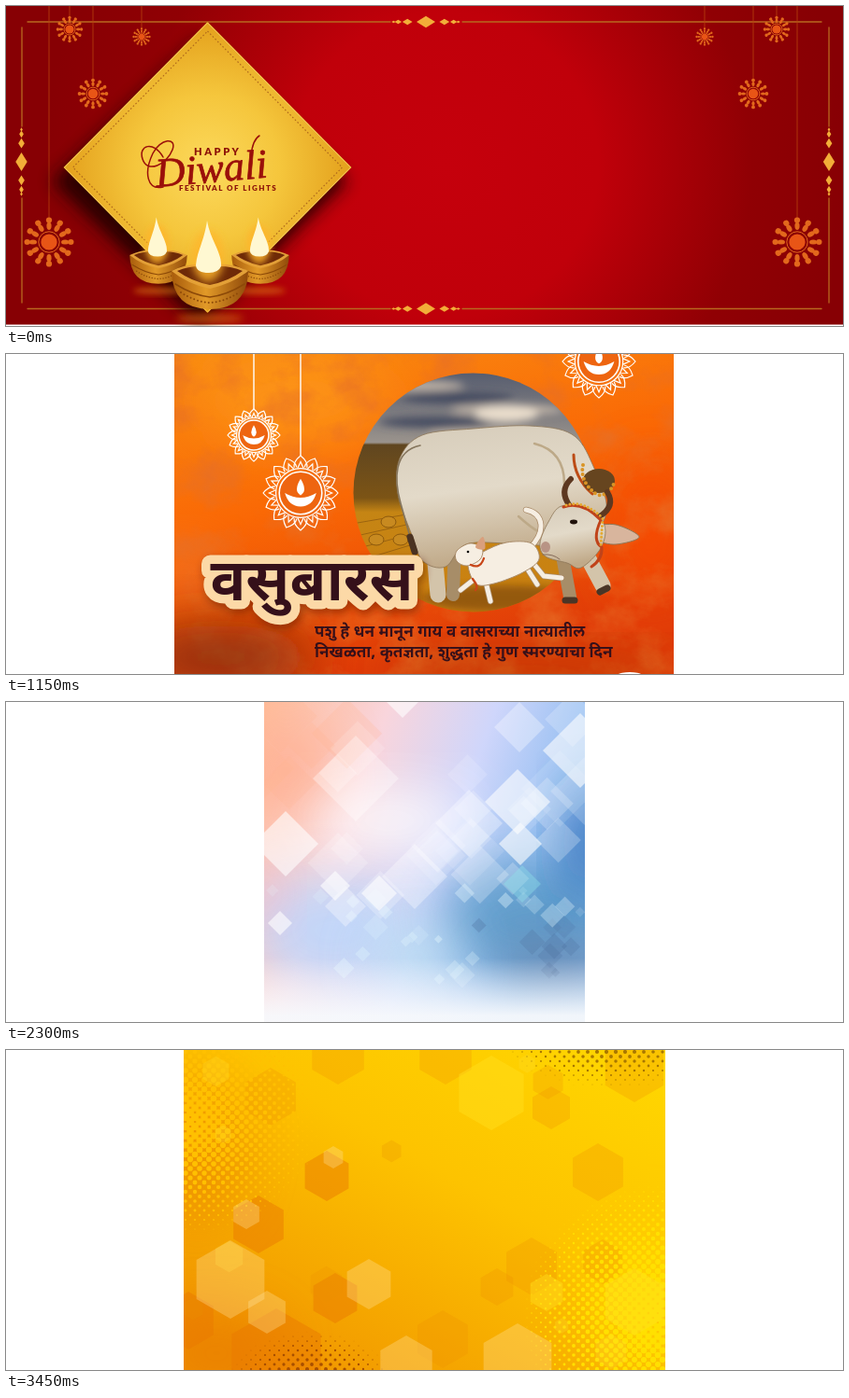
Write an HTML page that moves like this. It is 895 by 343 pixels and loops after 4600 ms.

```html
<!DOCTYPE html>
<html lang="mr">
<head>
<meta charset="utf-8">
<title>Festive banners</title>
<style>
html, body { margin: 0; width: 100%; height: 100%; overflow: hidden; background: #fff }
svg { display: block }
.caps { font-family: Lato, sans-serif; font-weight: 900; fill: #8c1208 }
.script { font: italic 44px "Liberation Serif", serif; fill: #9a0f0a; stroke: #9a0f0a; stroke-width: .7 }
.deva { font-family: "Noto Sans Devanagari", "Noto Sans", sans-serif; fill: #35101a }
</style>
</head>
<body>
<svg width="895" height="343" viewBox="0 0 895 343">
<defs>
  <radialGradient id="red" gradientUnits="userSpaceOnUse" cx="470" cy="170" r="430">
    <stop stop-color="#c5000c"/><stop offset=".38" stop-color="#c0000a"/>
    <stop offset=".76" stop-color="#900004"/><stop offset="1" stop-color="#870004"/>
  </radialGradient>
  <radialGradient id="gold"><stop stop-color="#fcd95c"/><stop offset=".5" stop-color="#f5c63c"/><stop offset="1" stop-color="#e3a01c"/></radialGradient>
  <linearGradient id="bowl"><stop stop-color="#a85c0c"/><stop offset=".45" stop-color="#e29a28"/><stop offset="1" stop-color="#904a0a"/></linearGradient>
  <linearGradient id="orange" x2=".35" y2="1"><stop stop-color="#f98c12"/><stop offset=".5" stop-color="#fa6805"/><stop offset="1" stop-color="#e03c08"/></linearGradient>
  <linearGradient id="land" x2="0" y2="1">
    <stop stop-color="#575d6f"/><stop offset=".29" stop-color="#9a938c"/><stop offset=".3" stop-color="#604620"/>
    <stop offset=".52" stop-color="#7c5415"/><stop offset=".58" stop-color="#c58514"/><stop offset="1" stop-color="#cc8010"/>
  </linearGradient>
  <linearGradient id="hide" x2=".2" y2="1"><stop stop-color="#d6ccba"/><stop offset=".5" stop-color="#e3dac9"/><stop offset="1" stop-color="#c0a988"/></linearGradient>
  <linearGradient id="sky" x2="1" y2=".35"><stop stop-color="#ffbf9c"/><stop offset=".35" stop-color="#f9d5dc"/><stop offset=".65" stop-color="#cfd6fb"/><stop offset="1" stop-color="#84b8ee"/></linearGradient>
  <linearGradient id="fade" x2="0" y2="1"><stop offset=".8" stop-color="#fff" stop-opacity="0"/><stop offset=".98" stop-color="#f7f9fc" stop-opacity=".95"/></linearGradient>
  <linearGradient id="amber" x1="1" x2=".15" y2="1"><stop stop-color="#ffd800"/><stop offset=".45" stop-color="#fdc300"/><stop offset="1" stop-color="#f09300"/></linearGradient>
  <filter id="b4" x="-50%" y="-50%" width="200%" height="200%"><feGaussianBlur stdDeviation="4"/></filter>
  <filter id="b9" x="-50%" y="-50%" width="200%" height="200%"><feGaussianBlur stdDeviation="9"/></filter>
  <filter id="b28" x="-80%" y="-80%" width="260%" height="260%"><feGaussianBlur stdDeviation="28"/></filter>
  <filter id="grunge" x="0" y="0" width="100%" height="100%">
    <feTurbulence type="fractalNoise" baseFrequency=".02 .026" numOctaves="6" seed="4"/>
    <feColorMatrix values="0 0 0 0 .8  0 0 0 0 .16  0 0 0 0 .02  2.2 0 0 0 -.9"/>
  </filter>
  <clipPath id="c1"><rect x="180" width="534" height="343"/></clipPath>
  <clipPath id="c2"><rect x="276" width="343" height="343"/></clipPath>
  <clipPath id="c3"><rect x="190" width="515" height="343"/></clipPath>
  <clipPath id="disc"><circle cx="499.5" cy="148.5" r="128"/></clipPath>
</defs>
<g id="scenes"></g>
</svg>
<script>
const HOLD = 1150;
const times = (n, fn) => Array.from({ length: n }, (_, i) => fn(i)).join('');
const points = s => s.split(',').map(p => p.trim().split(' ').map(Number));
const each = (s, fn) => points(s).map(p => fn(...p)).join('');
const circle = (x, y, r, a = '') => `<circle cx="${x}" cy="${y}" r="${r}" ${a}/>`;
const oval = (x, y, rx, ry, a = '') => `<ellipse cx="${x}" cy="${y}" rx="${rx}" ry="${ry}" ${a}/>`;
const glow = (x, y, rx, ry, color, o = 1) => oval(x, y, rx, ry, `fill="${color}" opacity="${o}" filter="url(#b28)"`);
const path = (d, a = '') => `<path d="${d}" ${a}/>`;
const line = (d, color, w, a = '') => path(d, `fill="none" stroke="${color}" stroke-width="${w}" stroke-linecap="round" stroke-linejoin="round" ${a}`);
const diamond = (x, y, w, h = w) => `M${x} ${y - h}l${w} ${h}l${-w} ${h}l${-w} ${-h}z`;
const hexagon = (x, y, r) => `M${x} ${y - r}l${r * .866} ${r / 2}v${r}l${-r * .866} ${r / 2}l${-r * .866} ${-r / 2}v${-r}z`;
const dot = (x, y, r) => `M${x - r} ${y}a${r} ${r} 0 1 0 ${2 * r} 0a${r} ${r} 0 1 0 ${-2 * r} 0`;

// Closed smooth outline through a few points
function blob(s, a) {
  const p = points(s), n = p.length, at = i => p[(i + n) % n];
  const mix = (a, b, c) => [0, 1].map(k => a[k] + (b[k] - c[k]) / 6);
  return path('M' + p[0] + p.map((q, i) =>
    `C${mix(q, at(i + 1), at(i - 1))} ${mix(at(i + 1), q, at(i + 2))} ${at(i + 1)}`).join('') + 'z', a);
}

function seeded(seed) {
  return (a = 0, b = 1) => {
    seed = (seed * 16807) % 2147483647;
    return a + (b - a) * seed / 2147483647;
  };
}

// Red banner with lamps
function rosette(x, y, r) {
  const spoke = i => `<g transform="rotate(${i * 30})">` +
    oval(0, -r * .66, r * .1, r * .16) + circle(0, -r * .9, r * .12) + '</g>';
  return line(`M${x} 0V${y - r}`, '#b8430f', .8) +
    `<g transform="translate(${x} ${y})" fill="#e2681c">` + circle(0, 0, r * .33, 'fill="#e85516"') +
    circle(0, 0, r * .43, 'fill="none" stroke="#e2681c"') + times(12, spoke) + '</g>';
}

function diya(x, y, s) {
  return `<g transform="translate(${x} ${y}) scale(${s})">` +
    oval(0, 47, 36, 5, 'fill="#e07a10" opacity=".6" filter="url(#b4)"') +
    path('M-41-4Q-40 37 0 37Q40 37 41-4z', 'fill="url(#bowl)"') +
    path('M-41-4Q-20-14 0-10Q20-14 41-4Q24 10 0 15Q-24 10-41-4z', 'fill="#e3a038"') +
    path('M-35-4Q-18-11 0-8Q18-11 35-4Q20 7 0 11Q-20 7-35-4z', 'fill="#6e2a08"') +
    line('M-37 10Q-18 22 0 24Q18 22 37 10', '#8c4908', 1.5) +
    line('M-31 19Q-16 29 0 30Q16 29 31 19', '#8c4908', 2, 'stroke-dasharray="0 4"') +
    oval(-2, -20, 17, 28, 'fill="#ffb62c" opacity=".8" filter="url(#b4)"') +
    path('M-3-58C0-38 13-24 12-9Q9-2-1-2Q-14-2-15-10C-14-25-6-36-3-58z', 'fill="#fff8d2"') + '</g>';
}

function festival() {
  let gems = '';
  for (let i = 0; i < 4; i++) for (const side of [-1, 1]) {
    const d = side * 35 * (1 - .5 ** i) * 1.13, a = i ? 7 - 1.6 * i : 10, b = a * .62;
    for (const y of [17, 324.5]) gems += diamond(449 + d, y, a, b);
    for (const x of [16.5, 880]) gems += diamond(x, 167 + d, b, a);
  }
  return '<rect width="895" height="341.5" fill="url(#red)"/>' +
    line('M23 17H411M488 17H872M23 324.5H411M488 324.5H872M17 23V129M17 206V318M880 23V129M880 206V318', '#b9681f', 1.3) +
    path(gems, 'fill="#f2ad38"') +
    each('68 25 14,145 33 9.5,93 94 16,46 253 26', (x, y, r) => rosette(x, y, r) + rosette(892 - x, y, r)) +
    path(diamond(207, 188, 158, 154), 'fill="#200" opacity=".9" filter="url(#b9)"') +
    path(diamond(215.5, 173, 154, 156), 'fill="url(#gold)"') +
    path(diamond(215.5, 173, 153, 155), 'fill="none" stroke="#f5cf60"') +
    path(diamond(215.5, 173, 144, 146), 'fill="none" stroke="#b06a1c" stroke-width="1.2" stroke-dasharray="1.6 2.2"') +
    '<text class="caps" x="201" y="160" font-size="11" letter-spacing="2.6">HAPPY</text>' +
    '<text class="script" transform="translate(161 194) rotate(-5)">Diwali</text>' +
    line('M168 162C158 144 141 149 146 164C151 180 172 170 178 154C183 140 165 142 157 158C147 179 151 198 168 194M262 160Q264 143 271 139', '#9a0f0a', 1.5) +
    '<text class="caps" x="185" y="198" font-size="8" letter-spacing="1.5">FESTIVAL OF LIGHTS</text>' +
    diya(163, 270, .75) + diya(272, 270, .75) + diya(218, 288, 1);
}

// Cow and calf poster
function pendant(x, y, r) {
  const petal = i => `<g transform="rotate(${i * 22.5})">` +
    path(`M${-r * .17} ${-r * .68}Q${-r * .2} ${-r * .84} 0 ${-r}Q${r * .2} ${-r * .84} ${r * .17} ${-r * .68}`) +
    path(`M${-r * .08} ${-r * .66}L0 ${-r * .84}L${r * .08} ${-r * .66}`) + '</g>';
  return line(`M${x} 0V${y - r}`, '#fff', 1.4) +
    `<g transform="translate(${x} ${y})" fill="none" stroke="#fff" stroke-width="1.2">` + times(16, petal) +
    circle(0, 0, r * .66) + circle(0, 0, r * .57, 'fill="#ee6510" stroke-width="1.6"') +
    `<g fill="#fff" stroke="none" transform="scale(${r})"><path d="M-.42 0Q0 .25 .42 0Q.32 .36 0 .36Q-.32 .36-.42 0z"/>` +
    '<path d="M0-.38Q.2-.05 0 .06Q-.2-.05 0-.38z"/></g></g>';
}

function cow() {
  const hide = 'fill="url(#hide)" stroke="#8d7758" stroke-width=".8"';
  return line('M480 205L478 258M596 222L603 260', '#a78d68', 14) +
    line('M456 190L462 258M622 218L638 248', '#d3c4aa', 17) +
    blob('419 150,421 112,445 87,500 80,560 77,605 86,627 118,642 170,610 204,540 203,492 204,470 228,446 222,434 194', hide) +
    line('M443 98C414 104 415 135 422 160L432 196', '#85755c', 1.6) +
    line('M432 196L437 212', '#4b3322', 7) +
    line('M565 96Q597 104 597 139M548 174Q572 196 590 199', '#bda988', 2.5) +
    line('M607 108Q607 132 627 150', '#bc4b15', 3) +
    oval(634, 136, 17, 13, 'fill="#66451f"') +
    line('M617 119Q613 137 632 151Q644 153 650 139', '#d99425', 4, 'stroke-dasharray="0 5"') +
    line('M603 163Q591 147 604 134M635 174Q652 163 643 148', '#5d3820', 6) +
    blob('630 186,652 183,677 196,652 204,632 199', 'fill="#d8b59d" stroke="#8d7758"') +
    blob('594 163,622 166,640 184,636 208,615 229,600 224,577 217,571 203,580 180', hide) +
    line('M596 164Q616 157 636 178Q626 200 637 207Q638 220 626 228', '#c0431a', 3) +
    line('M599 162Q618 156 638 176L636 205', '#e5a92f', 3, 'stroke-dasharray="0 4"') +
    oval(607, 180, 4, 2.4, 'fill="#21130c"') + oval(577, 207, 5, 6, 'fill="#b89485"') +
    line('M574 215Q585 214 592 220', '#856b5b', 1) +
    line('M598 264H608M635 255L643 251', '#493526', 7);
}

function calf() {
  const coat = '#f6eee2', edge = '#a98a68';
  const limbs = 'M560 208C578 190 575 171 556 167M505 238L486 253M512 240L518 265M562 222L575 238L594 240M556 228L568 247';
  return line(limbs, edge, 6.5) + line(limbs, coat, 5) +
    blob('494 222,510 212,535 202,562 203,570 220,553 234,522 246,502 246', `fill="${coat}" stroke="${edge}"`) +
    blob('482 211,496 203,509 208,507 220,493 227,482 222', `fill="${coat}" stroke="${edge}"`) +
    blob('502 207,510 196,512 209', 'fill="#d99f7c"') +
    line('M497 226Q507 231 511 219M499 241Q506 250 502 253', '#c84518', 2.3) + circle(494, 212, 1.3);
}

function poster() {
  const title = 'class="deva" x="327" y="264" font-size="63" font-weight="700" text-anchor="middle" stroke-linejoin="round"';
  return '<g clip-path="url(#c1)"><rect x="180" width="534" height="343" fill="url(#orange)"/>' +
    glow(310, 50, 100, 50, '#ffa01a', .6) + glow(690, 190, 40, 80, '#fb4a05', .7) + glow(190, 235, 26, 24, '#e8a56a', .5) +
    '<rect x="180" width="534" height="343" filter="url(#grunge)" opacity=".75"/>' +
    glow(230, 325, 100, 34, '#7d2a10', .85) + glow(560, 345, 160, 18, '#a8380c', .7) +
    '<g clip-path="url(#disc)"><rect x="371" y="20" width="258" height="258" fill="url(#land)"/><g filter="url(#b4)">' +
    times(5, i => oval(430 + i * 53 % 130, 34 + i * 13, 60, 6, `fill="${i % 2 ? '#454c60' : '#bcb0a4'}"`)) +
    oval(535, 64, 34, 9, 'fill="#e8dccb"') + '</g>' +
    times(6, i => line(`M370 ${182 + i * 14}L${440 + i * 6} ${170 + i * 9}`, '#9c6410', 1)) +
    times(4, i => oval(396 + i * 13, 199 - i % 2 * 19, 8, 6, 'fill="#c88a20" stroke="#8d590d"')) +
    oval(535, 262, 90, 14, 'fill="#713f08" opacity=".6" filter="url(#b4)"') + '</g>' +
    cow() + calf() +
    pendant(265, 87, 28) + pendant(315, 149, 40) + pendant(634, 8, 39) +
    `<text ${title} style="fill:#591600;stroke:#591600" stroke-width="20" opacity=".45" transform="translate(2 4)" filter="url(#b4)" aria-hidden="true">वसुबारस</text>` +
    `<text ${title} stroke="#fcd9a7" stroke-width="19" paint-order="stroke">वसुबारस</text>` +
    '<g class="deva" font-size="17.1" font-weight="600"><text x="330" y="303">पशु हे धन मानून गाय व वासराच्या नात्यातील</text>' +
    '<text x="330" y="325">निखळता, कृतज्ञता, शुद्धता हे गुण स्मरण्याचा दिन</text></g>' +
    oval(667, 352, 21, 11, 'fill="#fff"') + '</g>';
}

// Pastel squares
function pastel() {
  const rnd = seeded(71);
  const square = (x, y, r, o, fill = '#fff') => path(diamond(x, y, r), `fill="${fill}" fill-opacity="${o}"`);
  const large = () => {
    const x = rnd(276, 619), y = rnd(0, 210);
    return square(x, y, rnd(14, 42), rnd(.1, .24), x + y < 400 ? '#ffb08c' : '#fff');
  };
  const small = () => {
    const x = rnd(280, 615), y = rnd(200, 305);
    return square(x, y, rnd(4, 14), rnd(.15, .4), x > 505 && y > 235 ? '#4a6c9a' : '#e8faff');
  };
  return '<g clip-path="url(#c2)"><rect x="276" width="343" height="343" fill="url(#sky)"/>' +
    glow(300, 75, 50, 55, '#ffad93', .75) + glow(350, 245, 90, 60, '#bdd6fb', .9) +
    glow(560, 235, 95, 65, '#5f9ccb', .95) + glow(625, 150, 22, 65, '#245ca9', .85) +
    glow(592, 288, 70, 28, '#6f83a8', .75) + glow(275, 205, 18, 32, '#e8bce0', .9) +
    glow(440, 275, 50, 40, '#b9e0f0', .7) + glow(410, 127, 85, 28, '#fff', .9) +
    times(26, large) + times(34, small) +
    each('374 82 46,549 27 27,495 130 36,437 187 35,363 219 22', (x, y, r) => square(x, y, r, .32)) +
    each('299 152 35,547 107 35,550 152 23,399 205 19,352 197 16,293 237 13,614 52 40,424 -1 18', (x, y, r) => square(x, y, r, .6)) +
    square(552, 195, 20, .4, '#8ee0e8') + '<rect x="276" width="343" height="343" fill="url(#fade)"/></g>';
}

// Amber hexagons
function halftone(cx, cy, rx, ry, max, fill, step = 10) {
  let d = '';
  for (let row = 0, y = 2; y < 343; row++, y += step / 2)
    for (let x = 192 + row % 2 * step / 2; x < 706; x += step) {
      const near = 1 - Math.hypot((x - cx) / rx, (y - cy) / ry);
      if (near > .02) d += dot(x, y, +(max * near ** .7).toFixed(2));
    }
  return path(d, `fill="${fill}"`);
}

function amber() {
  const rnd = seeded(19);
  const cells = (fill, o, s) => `<g fill="${fill}" fill-opacity="${o}">` + each(s, (x, y, r) => path(hexagon(x, y, r))) + '</g>';
  const speck = i => path(hexagon(rnd(200, 700), i % 2 ? rnd(0, 120) : rnd(220, 335), rnd(8, 20)),
    `fill="${i % 3 ? '#ffdf30' : '#e99000'}" fill-opacity=".25"`);
  return '<g clip-path="url(#c3)"><rect x="190" width="515" height="343" fill="url(#amber)"/>' +
    glow(205, 105, 50, 75, '#ea8a00', .75) + glow(225, 325, 70, 45, '#e97b00', .7) + glow(690, 260, 60, 80, '#ffd000', .8) +
    cells('#e87800', .48, '289 332 55,195 290 31,352 266 27,270 187 31,343 135 27') +
    cells('#ec9000', .28, '467 310 31,562 232 31,525 254 20,283 50 31,355 5 32,470 5 32,583 62 23,633 131 31,638 227 24,672 20 36') +
    halftone(190, 75, 150, 125, 4.2, '#ffc000') + halftone(705, 285, 155, 145, 4.2, '#ffe000') +
    halftone(650, -16, 125, 58, 2.8, '#a97800') + halftone(325, 358, 90, 58, 2.6, '#a84f00') +
    times(10, speck) + cells('#ffdf20', .42, '519 46 40,672 270 36,578 260 20') +
    cells('#ffe3a0', .32, '240 246 42,279 281 23,257 176 16,388 251 27,428 338 32,547 335 42,350 115 12') + '</g>';
}

const stage = document.getElementById('scenes');
stage.innerHTML = [festival, poster, pastel, amber].map(draw => `<g>${draw()}</g>`).join('');
const scenes = [...stage.children];

function show(now) {
  const current = Math.floor(now / HOLD) % scenes.length;
  scenes.forEach((g, i) => g.style.display = i === current ? '' : 'none');
}
function tick() {
  show(performance.now());
  requestAnimationFrame(tick);
}
show(0);
requestAnimationFrame(tick);
</script>
</body>
</html>
```
